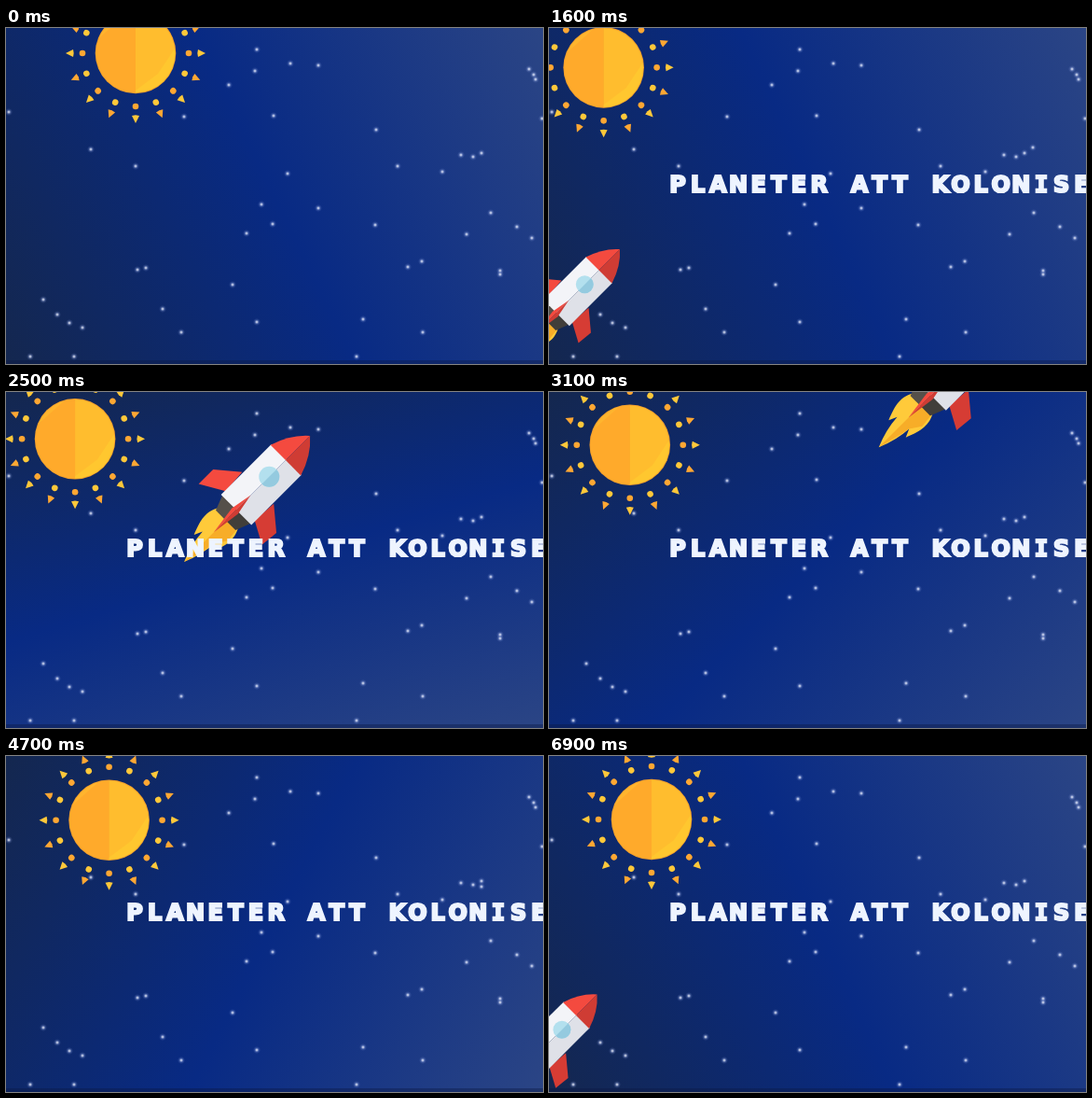
Animation, 576 px wide and 360 px high, one loop 7 s. Source, as an HTML page with a canvas:

```html
<!DOCTYPE html>
<html lang="sv">
<head>
<meta charset="utf-8">
<title>Planeter att kolonisera</title>
<style>
html, body { margin: 0; width: 100%; height: 100%; overflow: hidden; background: #0a2a80; }
canvas { display: block; width: 576px; height: 360px; }
</style>
</head>
<body>
<canvas id="stage" width="576" height="360"></canvas>
<script>
const W = 576, H = 360, LOOP = 7000;
const ctx = document.getElementById('stage').getContext('2d');

const STARS = [
  269,23, 267,46, 305,38, 335,40, 239,61, 287,94, 191,95, 397,109, 91,130, 139,148,
  302,156, 420,148, 468,154, 488,136, 501,138, 510,134, 561,44, 566,50, 568,55, 575,97,
  3,90, 274,189, 335,193, 286,210, 258,220, 396,211, 520,198, 548,213, 564,225, 494,221,
  446,250, 431,256, 530,260, 530,264, 141,259, 150,257, 243,275, 269,315, 168,301, 188,326,
  40,291, 55,307, 68,316, 82,321, 26,352, 73,352, 383,312, 447,326, 376,352
];
// [ms, degrees]
const SKY_TURN = [[0, 64], [1600, 65], [2500, 163], [3800, 99], [4700, 117], [5600, 97], [7000, 65]];
// [ms, x, y]
const SUN_PATH = [[0, 139, 27], [900, 54, 40], [4900, 111, 69], [5600, 111, 69], [7000, 110, 68]];

const clamp = v => Math.max(0, Math.min(1, v));
const ease = p => p * p * (3 - 2 * p);

function along(keys, t) {
  let i = 0;
  while (i < keys.length - 2 && t >= keys[i + 1][0]) i++;
  const a = keys[i], b = keys[i + 1];
  const p = ease(clamp((t - a[0]) / (b[0] - a[0])));
  return a.slice(1).map((v, k) => v + (b[k + 1] - v) * p);
}

function poly(color, ...pts) {
  ctx.fillStyle = color;
  ctx.beginPath();
  for (let i = 0; i < pts.length; i += 2) ctx.lineTo(pts[i], pts[i + 1]);
  ctx.fill();
}

function disc(color, x, y, r, from = 0, to = Math.PI * 2) {
  ctx.fillStyle = color;
  ctx.beginPath();
  ctx.arc(x, y, r, from, to);
  ctx.fill();
}

function drawSky(t) {
  const a = along(SKY_TURN, t)[0] * Math.PI / 180;
  const dx = Math.sin(a), dy = -Math.cos(a);
  const half = (Math.abs(W * dx) + Math.abs(H * dy)) / 2;
  const g = ctx.createLinearGradient(W / 2 - dx * half, H / 2 - dy * half, W / 2 + dx * half, H / 2 + dy * half);
  g.addColorStop(0, '#14274f');
  g.addColorStop(0.5, '#082a84');
  g.addColorStop(1, '#2b4585');
  ctx.fillStyle = g;
  ctx.fillRect(0, 0, W, H);
  ctx.fillStyle = 'rgba(10,24,66,.4)';
  ctx.fillRect(0, 356, W, 4);
}

function drawStar(x, y) {
  const g = ctx.createRadialGradient(x, y, 0, x, y, 4);
  g.addColorStop(0, 'rgba(255,255,255,.95)');
  g.addColorStop(0.3, 'rgba(215,224,255,.6)');
  g.addColorStop(0.6, 'rgba(150,170,230,.22)');
  g.addColorStop(1, 'rgba(150,170,230,0)');
  disc(g, x, y, 4);
}

function drawStars(t) {
  for (let i = 0; i < STARS.length; i += 2) drawStar(STARS[i], STARS[i + 1]);
  const glint = (x, y, at) => {
    ctx.globalAlpha = clamp(1.5 - Math.abs(t - at) / 300);
    drawStar(x, y);
    ctx.globalAlpha = 1;
  };
  glint(519, 128, 1600);
  glint(510, 140, 4700);
}

function drawSun(t) {
  const [x, y] = along(SUN_PATH, t);
  const orange = '#ffa733', yellow = '#ffc83a';
  ctx.save();
  ctx.translate(x, y);
  for (let i = 0; i < 16; i++) {
    ctx.save();
    ctx.rotate(i * Math.PI / 8);
    disc(i % 2 ? yellow : orange, 57, 0, 3.3);
    poly(i % 2 ? orange : yellow, 67, -4, 75, 0, 67, 4, 66.3, 0);
    ctx.restore();
  }
  disc('#f5a02c', 0, 0, 43.3);
  ctx.beginPath();
  ctx.arc(0, 0, 42.3, 0, Math.PI * 2);
  ctx.clip();
  poly('#ffaa2b', -44, -44, 0, -44, 0, 44, -44, 44);
  poly('#ffb52e', -44, -12, -8, -44, -44, -44);
  poly('#ffbd2e', 0, -44, 44, -44, 44, 44, 0, 44);
  poly('#ffc72f', 0, 40, 24, 22, 44, -8, 44, 44, 0, 44);
  ctx.restore();
}

// The rocket points along +x, with its window at the origin.
function drawRocket(t) {
  const flight = t > 5000 ? t - 5390 : t;
  const p = (flight - 1600) / 900;
  if (p < -1 || p > 2.2) return;
  const size = 0.86 + 0.14 * clamp(p);
  ctx.save();
  ctx.translate(38 + 244 * p, 275 - 184 * p);
  ctx.rotate(-Math.PI / 4);
  ctx.scale(size, size);

  ctx.fillStyle = '#ffca3a';
  ctx.beginPath();
  ctx.moveTo(-62, -15);
  ctx.bezierCurveTo(-76, -23, -88, -18, -101, -13);
  ctx.lineTo(-92, -9);
  ctx.quadraticCurveTo(-110, -8, -129, 0);
  ctx.quadraticCurveTo(-110, 8, -92, 9);
  ctx.lineTo(-101, 13);
  ctx.bezierCurveTo(-88, 18, -76, 23, -62, 15);
  ctx.fill();
  poly('#f7ad28', -62, 0, -129, 0, -106, 6, -92, 9, -80, 17, -62, 15);

  poly('#f44a3f', -17, -24, -37, -48, -59, -48, -44, -22);
  poly('#d63c34', -17, 24, -37, 48, -57, 46, -44, 22);
  poly('#55504a', -48, -22, -66, -15, -66, 0, -48, 0);
  poly('#413e3a', -48, 0, -66, 0, -66, 15, -48, 22);

  ctx.fillStyle = '#f3f4f8';
  ctx.fillRect(-50, -23, 76, 23);
  ctx.fillStyle = '#dfe1e8';
  ctx.fillRect(-50, 0, 76, 23);

  ctx.fillStyle = '#f44a3f';
  ctx.beginPath();
  ctx.moveTo(25, 0);
  ctx.lineTo(25, -23);
  ctx.quadraticCurveTo(48, -16, 62, 0);
  ctx.fill();
  ctx.fillStyle = '#cf3c34';
  ctx.beginPath();
  ctx.moveTo(25, 0);
  ctx.lineTo(25, 23);
  ctx.quadraticCurveTo(48, 16, 62, 0);
  ctx.fill();

  disc('#b3e0ee', 0, 0, 11);
  disc('#94cadf', 0, 0, 11, 0, Math.PI);
  poly('#f44a3f', -28, 0, -52, -4.5, -84, 0);
  poly('#cf3c34', -28, 0, -52, 4.5, -84, 0);
  ctx.restore();
}

function drawTitle(t) {
  ctx.globalAlpha = ease(clamp((t - 100) / 600));
  ctx.fillStyle = ctx.strokeStyle = '#eef4ff';
  ctx.lineWidth = 2.2;
  ctx.lineJoin = 'miter';
  ctx.miterLimit = 3;
  ctx.textAlign = 'center';
  [...'PLANETER ATT KOLONISERA'].forEach((c, i) => {
    const face = c === 'I' ? '"DejaVu Sans Mono", monospace' : '"DejaVu Sans", sans-serif';
    ctx.font = `bold 24px ${face}`;
    const x = 138 + i * 21.67;
    ctx.fillText(c, x, 176);
    ctx.strokeText(c, x, 176);
  });
  ctx.globalAlpha = 1;
}

const start = performance.now();
function draw() {
  const t = (performance.now() - start) % LOOP;
  drawSky(t);
  drawStars(t);
  drawSun(t);
  drawRocket(t);
  drawTitle(t);
  requestAnimationFrame(draw);
}
draw();
</script>
</body>
</html>
```
